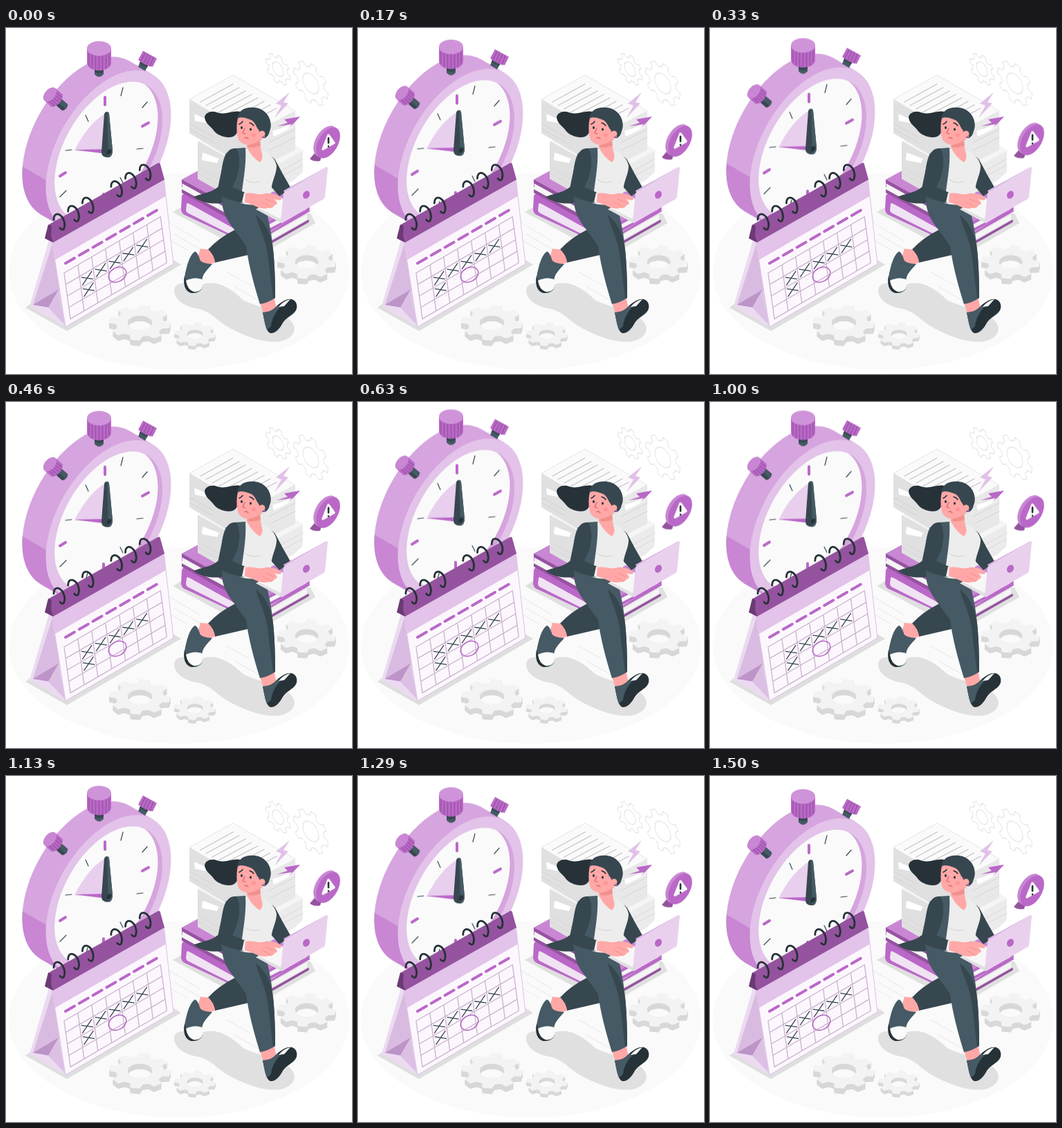
Recreate the animation shown at these times as an HTML page. Size 500 by 500 pixels, loop 1.54 s.

```html
<!DOCTYPE html>
<html lang="en">
<head>
<meta charset="utf-8">
<title>Deadline</title>
<style>
html, body { margin: 0; width: 100%; height: 100%; overflow: hidden; background: #fff; }
svg { display: block; width: 100vw; height: 100vh; }
.float { animation: float 1540ms linear infinite; }
@keyframes float {
  0%, 97.4%, 100% { transform: translateY(0); }
  48.7% { transform: translateY(-10px); }
}
.line { fill: none; stroke-linecap: round; stroke-linejoin: round; }
.thin { vector-effect: non-scaling-stroke; }
.p0 { fill: #e3c3e9; } .p1 { fill: #d6a4de; } .p2 { fill: #c886d3; }
.p3 { fill: #ba68c8; } .p4 { fill: #95539f; } .p5 { fill: #6b3a74; }
.d0 { fill: #455a64; } .d1 { fill: #37474f; } .d2 { fill: #263238; }
.skin { fill: #ffa8a7; }
</style>
</head>
<body>
<svg viewBox="0 0 500 500">
<defs>
  <clipPath id="recess"><circle r="90"/></clipPath>
  <path id="ring" class="line" d="M-7-3C-7-11-2-13 3-9C8-5 10 4 8 9C7 12 4 12 2 9" stroke="#263238" stroke-width="2.8"/>
</defs>

<ellipse cx="250" cy="352" rx="246" ry="142" fill="#fafafa"/>
<path class="line" stroke="#e8e8e8" d="M235 281L281 308M243 298L292 326M238 307L262 321M318 352L352 371M330 374L372 398"/>
<g id="gears"></g>

<!-- books -->
<path fill="#e0e0e0" d="M241 266L262 254L440 268L447 282L372 325L345 322Z"/>
<path class="p3" d="M254 244Q254 239 260 239L372 301L438 260L439 265L376 301V320L370 322L258 270Q253 267 253 262Z"/>
<path fill="#f0e3f3" d="M261 255Q260 252 265 254L362 308V317L264 268Q260 266 260 262Z"/>
<path fill="#f5f5f5" d="M374 304L435 269V277L374 311Z"/>
<path class="p4" d="M372 314L437 277Q439 279 437 281L372 318Z"/>
<path class="p2" d="M254 219L278 206L438 250L439 262L372 296L254 230Z"/>
<path class="p3" d="M376 282L438 247V262L376 297Z"/>
<path class="p4" d="M254 219L372 284V290L254 224Z"/>
<path fill="#f5f5f5" d="M255 225L372 290V296L255 233Z"/>
<path class="p4" d="M254 233L372 297V303L254 238Z"/>
<path fill="#f5f5f5" d="M378 285L434 255V262L378 291Z"/>

<!-- papers -->
<path fill="#e0e0e0" d="M277 163L365 212V268L277 218Z"/>
<path fill="#ebebeb" d="M365 212L429 177V208L416 220L365 248Z"/>
<path fill="#f5f5f5" d="M277 163L340 150L417 168L429 177L365 212Z"/>
<path class="line" stroke="#d4d4d4" stroke-width=".8" d="M278 202L330 231M278 210L325 236M392 209L429 189M395 216L429 198"/>
<path fill="#fff" d="M284 180L308 189L305 195L283 191Z"/>
<path fill="#e0e0e0" d="M265 103L352 153V204L265 152Z"/>
<path fill="#e8e8e8" d="M352 153L418 120V176L352 210Z"/>
<path fill="#fafafa" stroke="#e0e0e0" stroke-width=".8" d="M265 103L328 68L418 120L352 155Z"/>
<path class="line" stroke="#d0d0d0" stroke-width=".8" d="M266 138L300 157M266 146L300 165M376 155L418 133M380 166L418 146M380 177L418 158"/>
<path fill="#fff" d="M272 124L292 133L288 137L273 134ZM385 149L416 138L413 144L387 157Z"/>
<path class="line" stroke="#c4c4c4" stroke-width="1.3" d="M281 107L328 81M289 112L337 86M298 117L346 91M307 122L355 96M316 126L364 101M325 132L373 106M337 135L382 111M350 138L391 116"/>

<path fill="#e0c1e8" d="M410 93L390 109L398 112L388 130L408 109L401 107Z"/>
<path class="p3" d="M425 128L402 132L407 137L391 142L413 139L408 146Z"/>

<!-- stopwatch -->
<g class="float">
  <g transform="matrix(.866 -.5 0 1 148 178)">
    <path class="p1" d="M73.9-73.9L34.6-113.2A104.5 104.5 0 0 0-113.2 34.6L-73.9 73.9Z"/>
    <path class="p2" d="M-104-10L-143.3-49.3A104.5 104.5 0 0 0-113.2 34.6L-73.9 73.9Z"/>
    <circle class="p0" r="104.5"/>
    <circle class="p1" r="90"/>
    <circle cx="-7.5" cy="-7.5" r="90" fill="#fafafa" clip-path="url(#recess)"/>
  </g>
  <path class="line" stroke="#ba68c8" stroke-width="4" d="M143 100V111M141 240V251M197 142L206 137M78 214L86 209"/>
  <path class="line" stroke="#37474f" stroke-width="1.2" d="M169 86L166 98M204 107L197 115M198 174L189 175M115 126L119 135M86 177L95 176M78 244L87 235M165 216L169 224M118 253L115 264"/>
  <path fill="#e8cfee" d="M146 122Q119 137 99 177L146 181Z"/>
  <path class="p3" d="M99 176L146 175V182Z"/>
  <path class="d1" d="M142 124Q145 118 149 124L154 177Q154 187 147 187Q138 187 138 179Z"/>
  <path class="d0" d="M146 121Q149 121 149 124L154 177Q154 185 148 187Z"/>
  <ellipse class="d2" cx="149" cy="179" rx="2.8" ry="4" transform="rotate(25 149 179)"/>
  <path class="d0" d="M128 56V67Q134.500 74 141 67V56Z"/>
  <path class="d1" d="M128 56V63Q134.500 68 141 63V56Z"/>
  <path class="p3" d="M117 30V51C119 65 150 65 152 51V30Z"/>
  <path class="line" stroke="#95539f" stroke-width="1.3" d="M120 37V54M124.500 39V58M129.500 40V60M134.500 41V60M139.500 40V60M144.500 39V58M149 37V54"/>
  <ellipse cx="134.500" cy="29.500" rx="17.500" ry="10.500" fill="#cf93da"/>
  <g transform="translate(68 100) rotate(-49)">
    <path class="d1" d="M-6 8H6V23Q0 27-6 23Z"/>
    <path class="d0" d="M-1 8H6V23Q3 25-1 25Z"/>
    <path class="p3" d="M-12-5V8Q0 17 12 8V-5Z"/>
    <path class="line" stroke="#95539f" stroke-width="1.2" d="M-8-2V10M-4 0V12M0 1V12M4 0V12M8-2V10"/>
    <ellipse class="p2" cy="-6" rx="12" ry="7.500"/>
  </g>
  <path class="d0" d="M195 46L206 53L201 62L191 56Z"/>
  <path class="d1" d="M195 46L206 53L204 57L193 51Z"/>
  <path class="p3" d="M198 33L218 44L212 56Q201 55 191 46Z"/>
  <path class="line" stroke="#95539f" stroke-width="1.3" d="M201 36L195 48M205 38L199 51M209 40L203 53M213 42L208 55"/>
</g>

<!-- calendar -->
<path fill="#dedede" d="M28 404L36 398L88 420L236 332L253 342L88 438Z"/>
<path fill="#ecdaf1" d="M64 300L34 402L86 432L78 350Z"/>
<path fill="#d9bbe1" d="M67 312L39 400L62 403L78 379L84 421Z"/>
<path fill="#bd94c7" d="M39 400L76 378L62 404Z"/>
<path fill="#dcc0e4" d="M76 378L61 404L85 429Z"/>
<path fill="#fcf7fd" stroke="#dcc0e3" stroke-width="1" d="M66 306L228 216L242 341L86 432Z"/>
<path class="p0" d="M66 305L228 216L231 243L71 335Z"/>
<path class="p4" d="M62 284L220 195Q222 194 223 197L229 219L68 310L64 304Z"/>
<path class="p5" d="M61 284L66 286L65 300L68 310L56 304Z"/>
<g id="rings"></g>
<path class="line" id="dashes" stroke="#ba68c8" stroke-width="4"/>
<g transform="matrix(19.9 -11.6 2.25 16.6 84 354)">
  <path class="line thin" id="grid" stroke="#c9b3ce" stroke-width="1.3"/>
  <path class="line thin" id="crosses" stroke="#37474f" stroke-width="1.3"/>
</g>
<ellipse class="line" cx="161" cy="356.500" rx="13.500" ry="10" transform="rotate(-30 161 356.500)" stroke="#ba68c8" stroke-width="1.5"/>

<!-- runner -->
<path fill="#e0e0e0" d="M243 379C243 367 260 367 280 372C304 361 326 377 344 394C362 402 383 406 407 419C424 432 418 448 396 453C374 456 347 446 324 434C300 420 297 409 274 405C255 401 243 391 243 379Z"/>
<path class="d1" d="M314 222C302 238 286 238 271 244C281 252 299 256 316 252L325 238Z"/>
<path class="d1" d="M330 292Q308 303 292 320Q300 328 302 339L354 327L352 296Z"/>
<path class="skin" d="M281 319L292 320Q301 328 302 339L290 343L276 336Z"/>
<path class="d0" d="M273 323C265 328 261 344 258 360C255 376 263 384 272 383C282 382 286 376 283 366C284 354 291 350 298 341C289 341 280 338 280 334Q277 324 273 323Z"/>
<path class="d2" d="M258 358C255 376 263 384 272 383L262 372Z"/>
<path fill="#fafafa" d="M260 365Q272 359 283 363C287 377 280 382 271 381Q262 378 260 365Z"/>
<path class="skin" d="M366 394L387 387L391 406Q381 417 372 413Z"/>
<path class="d0" d="M312 247C312 266 320 279 329 290L347 315C351 345 359 373 367 399Q379 397 389 390C389 364 388 338 386 320C384 296 379 276 375 258Z"/>
<path class="d1" d="M361 270C364 286 375 304 378 326L386 391L389 390C389 364 388 338 386 320C383 299 377 284 361 270Z"/>
<path class="d2" d="M371 411C380 411 387 407 391 402C398 396 405 391 413 392C420 394 422 402 419 408C414 416 406 417 400 426C395 436 388 442 382 441C375 438 374 425 371 411Z"/>
<path class="d0" d="M371 411C380 411 387 407 391 402L399 401C390 409 384 420 383 431L377 436C374 428 373 420 371 411Z"/>
<path fill="#f5f5f5" d="M394 403Q401 394 411 392L402 402Z"/>

<path class="d1" d="M374 181Q388 186 391 194L400 211L412 232L395 243L380 226Z"/>
<path fill="#ededed" d="M342 175L370 177Q388 184 391 199C391 215 381 222 383 250Q358 260 336 252L338 195Z"/>
<path class="line" stroke="#d2d2d2" d="M346 219Q355 226 367 222"/>
<path class="skin" d="M346 164L349 174Q356 188 367 194Q373 188 369 178L366 160Z"/>
<path class="d0" d="M331 174L346 173C348 200 341 228 339 254L312 247C309 224 311 194 318 181Z"/>
<path class="d1" d="M333 174C320 173 316 183 312 203L306 232C305 243 316 247 343 253L346 238L327 230C337 212 341 190 333 174Z"/>
<path fill="#f0f0f0" d="M344 238L350 237L347 253L341 252Z"/>

<path fill="#e0e0e0" d="M361 262L393 243L414 261L398 282Z"/>
<path fill="#f7f7f7" d="M364 260L394 243L408 252L397 276Z"/>
<path class="skin" d="M346 239C359 237 366 243 375 239C386 238 398 243 398 248Q394 250 387 247Q396 254 388 256Q386 261 379 260C367 264 357 254 345 252Z"/>
<path class="line" stroke="#f28f8f" d="M375 247L386 252M371 252L382 258"/>
<path fill="#d6b1df" d="M401 235L463 201L465 203L403 239Z"/>
<path fill="#e9d1ee" d="M404 236L463 201Q465 201 465 203L461 244Q461 246 459 247L399 282Q397 282 397 280L401 239Z"/>
<ellipse class="p3" cx="434" cy="241" rx="4.700" ry="6" transform="rotate(28 434 241)"/>

<path class="d2" d="M342 122C328 117 318 127 305 122C297 119 288 122 287 129C288 138 296 142 300 148C306 156 320 160 328 157C334 154 337 148 334 136Z"/>
<path class="skin" d="M336 127C332 139 333 157 337 163C344 171 357 169 369 162L376 151L369 130Z"/>
<path fill="#f28f8f" d="M350 169Q362 167 367 162L368 170Q358 174 349 172Z"/>
<path class="d1" d="M334 131C335 117 350 112 365 116C380 121 386 137 381 149C379 158 373 161 370 158L365 147C361 143 361 135 352 132C345 129 338 128 334 131Z"/>
<circle class="skin" cx="370" cy="153" r="4.500"/>
<circle class="p3" cx="373" cy="157" r="1.600"/>
<ellipse class="d2" cx="340.500" cy="144" rx="1.500" ry="2"/>
<ellipse class="d2" cx="353.500" cy="146.500" rx="1.500" ry="2"/>
<path class="line" stroke="#263238" stroke-width="1.500" d="M337 139Q340 138 342 135M352 137Q356 138 358 141"/>
<path class="line" stroke="#d9615f" stroke-width="1.100" d="M345 145L342 152L346 153M345 159Q347 157 350 160"/>
<circle cx="358" cy="155" r="3" fill="#ff8580" opacity=".5"/>

<!-- alert -->
<g class="float">
  <path class="p4" d="M446 181L439 189Q445 194 454 192L456 185Z"/>
  <g transform="matrix(.866 -.5 0 1 465.500 166)">
    <circle class="p2" cx="-4.600" cy="-4.600" r="20"/>
    <path class="p2" d="M14.100-14.100L9.500-18.700L-18.700 9.500L-14.100 14.100Z"/>
    <circle class="p3" r="20"/>
  </g>
  <path d="M466 155L458 175L474 166Z" fill="#fafafa" stroke="#fafafa" stroke-width="3.500" stroke-linejoin="round"/>
  <path class="line" stroke="#263238" stroke-width="2.600" d="M466 159V166M466 171V171.200"/>
</g>
</svg>
<script>
const $ = id => document.getElementById(id);
const times = (n, fn) => Array.from({ length: n }, (_, i) => fn(i)).join('');

// Toothed wheel with a round hole, centred on the origin.
function gearPath(R, teeth, hole) {
  const pts = [];
  for (let i = 0; i < teeth; i++) {
    const mid = (i + .2) * 2 * Math.PI / teeth;
    for (const [off, k] of [[-.31, .78], [-.18, 1], [.18, 1], [.31, .78]]) {
      const a = mid + off * 2 * Math.PI / teeth;
      pts.push((R * k * Math.cos(a)).toFixed(1) + ' ' + (R * k * Math.sin(a)).toFixed(1));
    }
  }
  const h = R * hole;
  return `M${pts.join('L')}ZM${h} 0A${h} ${h} 0 1 0 ${-h} 0A${h} ${h} 0 1 0 ${h} 0Z`;
}

function floorGear(x, y, R, depth) {
  const d = gearPath(R - 1, 8, .43);
  const layer = (dy, color) => `<path d="${d}" fill="${color}" stroke="${color}" stroke-width="2"
    stroke-linejoin="round" fill-rule="evenodd" transform="translate(${x} ${y + dy}) scale(1 .577)"/>`;
  return times(depth, i => layer(depth - i, '#d8d8d8')) + layer(0, '#f3f3f3');
}

const wallGear = (x, y, R) => `<path class="line" d="${gearPath(R, 8, .46)}" stroke="#e4e4e4"
  stroke-width="1.2" transform="matrix(.866 .5 0 1 ${x} ${y})"/>`;

$('gears').innerHTML = wallGear(393, 59.5, 20.5) + wallGear(440.5, 80, 29) +
  floorGear(193.5, 426, 44.5, 8) + floorGear(273, 442.5, 30, 5) + floorGear(434.5, 338, 42.5, 8);

$('rings').innerHTML = [0, 1, 2, 4, 5, 6].map(i =>
  `<use href="#ring" x="${76 + i * 20.7}" y="${280 - i * 11.9}"/>`).join('');
$('dashes').setAttribute('d', times(7, i => `M${86 + i * 19.8} ${340 - i * 11.5}l13-7.5`));
$('grid').setAttribute('d', times(8, i => `M${i} 0V4`) + times(5, i => `M0 ${i}H7`));
$('crosses').setAttribute('d', [[1, 1], [2, 1], [3, 1], [4, 1], [5, 1], [1, 2]].map(([c, r]) =>
  `M${c + .13} ${r + .17}l.74 .66m0-.66l-.74 .66`).join(''));
</script>
</body>
</html>
```
